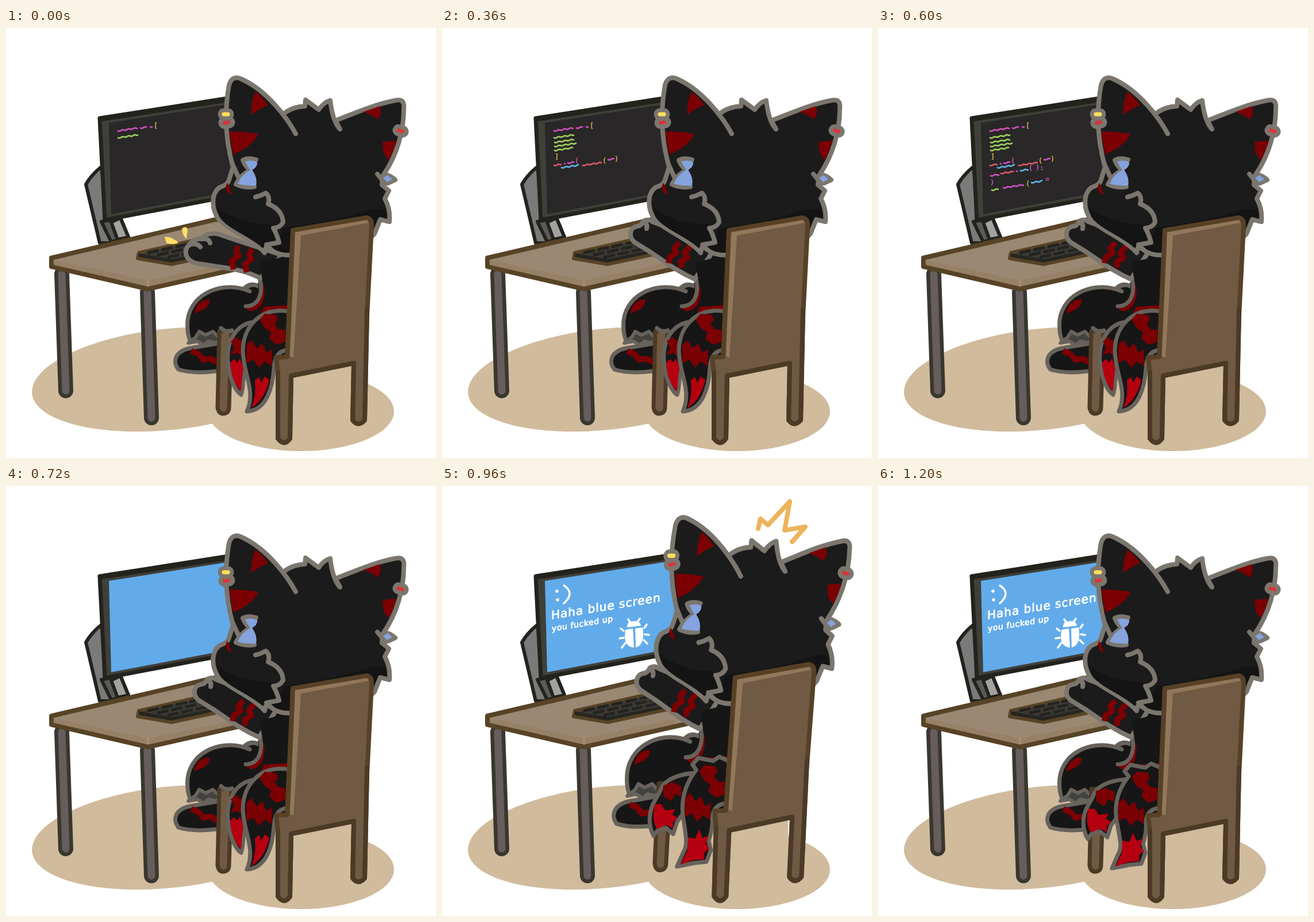
These frames come from a looping animation (748x748 px, 1920 ms). An HTML page:

```html
<!DOCTYPE html>
<html lang="en">
<head>
<meta charset="utf-8">
<title>Coding trouble</title>
<style>
html, body { margin: 0; width: 100%; height: 100%; overflow: hidden; background: #fff }
svg { display: block; width: 100%; height: 100% }
svg * { stroke-linecap: round; stroke-linejoin: round }
.line { fill: none }
.fur { fill: #1b1b1b; stroke: #7b766e; stroke-width: 8 }
.low { fill: #161616; stroke: #67625c; stroke-width: 7 }
.line.fur, .line.low { fill: none }
.red { fill: #7b0004 }
.zig { fill: none; stroke: #7b0004; stroke-width: 10; stroke-linecap: butt }
.tip { fill: #b5000f }
.wood { fill: #705a43; stroke: #574126; stroke-width: 8 }
.white { fill: none; stroke: #fff; stroke-width: 3.5 }
text { font-family: "DejaVu Sans", sans-serif }
#code text { font: bold 12px "DejaVu Sans Mono", monospace }
#code path { fill: none; stroke-width: 2.7 }
</style>
</head>
<body>
<svg viewBox="0 0 748 748">
  <!-- floor -->
  <g fill="#d0bb9c">
    <ellipse cx="285" cy="611" rx="241" ry="88" transform="rotate(-6 285 611)"/>
    <ellipse cx="513" cy="667" rx="162" ry="69"/>
    <path d="M480 595L602 575V612L560 640Z"/>
  </g>

  <!-- monitor -->
  <g stroke="#24221d" stroke-width="6">
    <path d="M164 243Q148 256 139 272L163 374L185 374L166 242" fill="#7a7a7a"/>
    <path d="M166 337L183 372L213 364L199 330Z" fill="#5b5b5b"/>
    <path d="M183 338L194 368L213 364L199 330Z" fill="#a2a2a0"/>
    <path d="M163 157L431 115L418 287L172 334Z" fill="#3f403a" stroke-width="7"/>
  </g>
  <path id="screen" d="M179 165L428 126L414 280L183 324Z"/>
  <path class="line" d="M165 158L429 118" stroke="#24221d" stroke-width="9"/>
  <g id="code"></g>
  <g id="crash" fill="#fff">
    <circle cx="200" cy="183" r="2.8"/><circle cx="201" cy="198" r="2.8"/>
    <path class="white" d="M212 173Q232 186 212 204"/>
    <g stroke="#fff" stroke-width=".8">
      <text transform="matrix(1 -.165 0 1 190 232)" font-size="20" letter-spacing="1">Haha blue screen</text>
      <text transform="matrix(1 -.165 0 1 191 253)" font-size="14" letter-spacing=".6">you fucked up</text>
    </g>
    <path d="M322 246Q321 236 333 235Q345 234 346 243Z"/>
    <path d="M319 250L332 248L334 281Q319 280 318 263ZM336 248L349 246Q354 276 337 281Z"/>
    <path class="white" d="M327 237L324 232M341 235L344 231M316 252L311 248M316 264L309 265M319 273L313 281M352 247L356 241M353 258L360 259M351 268L357 274"/>
  </g>

  <!-- desk -->
  <g class="line">
    <path d="M97 428L104 631M246 460L253 678" stroke="#39372f" stroke-width="26"/>
    <path d="M97 428L104 631M246 460L253 678" stroke="#665d5c" stroke-width="13"/>
  </g>
  <path d="M79 400L365 333L470 345L460 406L247 454L79 415Z" fill="#9a8873" stroke="#574326" stroke-width="8"/>
  <path class="line" d="M87 409L247 444L400 411" stroke="#91795a" stroke-width="9" opacity=".45"/>
  <path class="line" d="M247 438V448" stroke="#a58f72" stroke-width="3"/>
  <path d="M231 391L355 363L422 376L400 387L288 411L229 401Z" fill="#3a3933" stroke="#574326" stroke-width="6"/>
  <path d="M231 398L288 408L400 384V379L288 402L231 392Z" fill="#26251f"/>
  <path class="line" d="M246 391L362 366M263 395L378 370M281 399L393 375" stroke="#24231f" stroke-width="5" style="stroke-linecap:butt" stroke-dasharray="20 5"/>

  <g id="actor">
    <!-- legs and body -->
    <path class="low" d="M410 460Q421 443 437 448L450 440L500 480V560L400 570Z"/>
    <path class="low" d="M320 557C292 563 290 582 300 594Q325 602 366 597L400 580L390 545Z"/>
    <path class="zig" d="M322 562L335 567L343 577L355 575L371 583"/>
    <path d="M424 458C380 438 322 460 316 508Q314 530 322 548L440 545L490 500V440Z" fill="#161616"/>
    <path class="line low" d="M424 458C380 438 322 460 316 508Q314 530 321 546M415 452Q426 442 438 449"/>
    <path class="red" d="M327 497Q331 473 354 472Q355 482 345 489Z"/>
    <path d="M317 548L330 538L336 528L347 534L360 528L372 540L366 548L352 545L344 552L333 545Z" fill="#42433f" stroke="#67625c" stroke-width="6"/>
    <path d="M438 385H500V580H470L440 500Z" fill="#161616"/>
    <path class="red" d="M442 438Q452 448 449 467Q446 490 425 493L415 486Q442 480 442 438ZM448 485L490 482V515L440 508Z"/>
    <path class="line low" d="M441 434Q447 455 440 470Q433 484 417 484"/>

    <path class="wood" d="M371 527L368 660Q370 671 378 671Q388 670 388 660L392 527Z" style="stroke:#4b3a26;stroke-width:7"/>

    <!-- tails -->
    <g id="calm">
      <path class="low" d="M432 511C400 515 383 545 386 580C388 610 400 632 409 638C415 620 410 605 418 592L440 545Z"/>
      <path class="red" d="M391 545L401 537L408 545L414 537V574L402 565L390 569L397 556Z"/>
      <path class="tip" d="M390 582L397 576L402 582L407 575L413 590Q410 612 409 632Q391 613 390 582Z"/>
      <path class="low" d="M492 493C440 485 412 522 412 562C413 603 435 630 419 667C455 665 464 622 466 592Q467 562 490 560Z"/>
      <path class="tip" d="M433 613L440 607L444 617L450 606L458 612Q451 645 427 661Q436 638 433 613Z"/>
      <path class="line low" d="M374 522Q383 531 393 526"/>
    </g>
    <g id="puffed">
      <path class="low" d="M440 510C410 510 379 520 374 540L362 562Q351 590 365 614L373 603L386 601L399 611L405 591L413 580L440 550Z"/>
      <path class="red" d="M379 531L395 525L411 532L411 549L400 545L394 557L380 549Z"/>
      <path class="tip" d="M366 561L377 562L384 572L401 570L396 579L406 584L398 592L398 602L386 596L370 603Q360 585 366 561Z"/>
      <path class="low" d="M492 490L475 483L465 490L439 485L429 496L436 505C411 535 411 568 417 592C421 615 425 628 418 640L407 665L438 659L458 657L465 638L461 622Q468 600 466 585Q467 562 490 560Z"/>
      <path class="tip" d="M425 617L437 619L444 603L450 618L461 613L456 627L463 635L454 642V653L436 654L413 662L424 640Z"/>
    </g>
    <path class="red" d="M441 507L450 497L470 499L473 508L467 514L474 524L486 525V546L471 551L458 541L461 529L450 522ZM418 551L427 543L436 557L446 549L453 565L463 559L462 588L450 580L440 591L430 577L418 583Z"/>

    <!-- arms -->
    <g id="up">
      <path class="fur" d="M440 437C410 424 390 408 363 390L337 374C323 365 326 346 340 345Q347 344 350 336Q358 331 366 337L400 350L470 390Z"/>
      <path class="line fur" d="M350 338Q358 340 356 349"/>
      <path class="zig" d="M413 373L404 383L408 391L396 399L394 409M432 379L422 391L427 399L415 407L417 417"/>
    </g>
    <g id="down">
      <path class="fur" d="M442 435C410 418 370 416 335 410C314 407 306 389 319 377Q326 366 338 367Q350 355 368 358L400 369L480 395Z"/>
      <path class="line fur" d="M320 377Q332 373 338 381M341 367Q353 365 355 374"/>
      <path class="zig" d="M404 379L400 390L405 396L392 406L396 420M428 384L423 394L427 402L415 411L419 425"/>
      <path d="M276 363Q292 364 300 374Q288 378 279 374ZM306 349Q313 343 316 350L314 367Q306 360 306 349Z" fill="#ffe066"/>
    </g>
    <path d="M440 408L490 396V445L447 442Z" fill="#161616"/>

    <!-- head -->
    <path class="fur" d="M504 184C490 158 455 110 412 90Q394 80 388 99C379 150 383 200 395 242L388 264Q386 273 372 277C356 288 358 314 368 330C385 352 425 363 450 391L453 377Q468 396 494 395L600 400L641 358L651 333L667 337Q669 315 659 297L666 283L654 273L655 258C680 222 692 180 692 140Q694 122 677 126C640 133 605 149 573 161L581 176Q568 162 564 126Q553 129 544 142L521 125L520 136Q497 137 482 150"/>
    <path d="M367 312Q410 345 481 342L464 353L472 372L453 374L447 383C420 360 383 348 371 328ZM482 348Q580 335 625 318Q648 311 660 317L663 332L648 328L638 354L600 400L494 391Q470 391 462 380L474 372Z" fill="#141414"/>
    <path class="red" d="M434 111Q446 119 456 134Q441 140 427 151Q425 131 434 111ZM389 180Q415 180 439 184Q431 204 396 220Q391 202 389 180ZM621 146L650 136Q656 149 646 159Q635 149 621 146ZM655 198L679 196Q674 215 666 230L657 218ZM385 269L393 289Q383 288 382 276Z"/>
    <path class="line fur" d="M393 235L404 259M434 294Q443 292 452 287Q460 294 456 306Q481 316 482 338Q476 348 465 348Q471 358 475 373L453 377"/>

    <!-- ribbons and rings -->
    <path class="line fur" d="M435 229Q420 225 412 230Q416 241 425 247Q408 256 400 272Q415 279 432 276M646 254L660 271M657 263L664 256Q672 259 677 264L664 270Z"/>
    <path d="M416 232Q429 229 437 233Q438 242 428 247Q438 260 435 274Q420 275 403 271Q410 254 425 247Q420 241 416 232ZM656 261L664 256L672 263L663 268Z" fill="#85a3dd"/>
    <path class="line" d="M379 150L386 150M380 165L388 164M683 178L690 180" stroke="#7b766e" stroke-width="21"/>
    <path class="line" d="M379 150L386 150" stroke="#ffe05c" stroke-width="7"/>
    <path class="line" d="M380 165L387 164M683 178L690 180" stroke="#d93438" stroke-width="6"/>

    <!-- chair -->
    <path class="wood" d="M499 352L627 330Q637 332 636 345L628 500L624 682Q613 695 603 682L605 583L496 605L494 714Q484 729 473 714V600L470 573L489 572Z"/>
    <path class="line" d="M628 490L624 682Q613 695 603 682L605 583L496 605L494 714Q484 729 473 714V600" stroke="#4b3a26" stroke-width="8"/>
    <path d="M503 355L628 334L631 339L513 361L500 573L494 571Z" fill="#92775b"/>
  </g>
  <g class="line" stroke="#edb45c">
    <path id="shock" d="M550 74L554 57L567 68L605 27L596 77L632 71L609 97" stroke-width="8"/>
    <path id="fade" d="M549 60L553 53L560 57M597 25L606 21L606 31M628 69L638 71L632 78" stroke-width="6"/>
  </g>
</svg>
<script>
const $ = id => document.getElementById(id);
const pink = '#d04fc0', red = '#d8586c', blue = '#5fb4e8', green = '#9ccc5a', gold = '#d8b043';
// step, colour, x, y, then a squiggle width or a symbol
const tokens = [
  [0, pink, 195, 179, 33], [0, pink, 234, 174, 10], [0, pink, 251, 172, 3], [0, gold, 257, 174, '['],
  [0, green, 195, 191, 34], [1, green, 196, 199, 33], [1, green, 196, 206, 37], [2, green, 196, 213, 31],
  [2, gold, 196, 228, ']'],
  [3, red, 195, 239, 12], [3, pink, 213, 236, 1], [3, pink, 219, 235, 10], [3, pink, 231, 235, '('],
  [3, blue, 208, 243, 29], [3, red, 245, 239, 32], [3, gold, 279, 235, '('], [3, pink, 289, 229, 10],
  [3, gold, 300, 232, ')'],
  [4, pink, 196, 257, 14], [4, red, 214, 253, 21], [4, pink, 241, 249, 1], [4, blue, 248, 248, 13],
  [5, pink, 262, 248, '('], [5, pink, 274, 247, '):'],
  [5, pink, 195, 273, ')'], [5, green, 198, 282, 11], [5, pink, 218, 278, 35], [5, gold, 257, 275, '('],
  [5, blue, 267, 269, 18], [5, pink, 291, 267, '=']
];

function squiggle(x, y, w) {
  let d = `M${x} ${y}`;
  for (let i = 1; i <= w; i++) d += `L${x + i} ${y - i * .15 + Math.sin(i * .6) * .8}`;
  return d;
}

$('code').innerHTML = tokens.map(([, color, x, y, v]) => typeof v === 'number'
  ? `<path d="${squiggle(x, y, v)}" stroke="${color}"/>`
  : `<text x="${x}" y="${y}" fill="${color}">${v}</text>`).join('');

const show = (id, on) => $(id).style.display = on ? '' : 'none';

// lean and stretch grow with the height above the floor
function pose(lean, stretch) {
  const floor = 725;
  $('actor').setAttribute('transform',
    `matrix(1 0 ${-lean} ${1 + stretch} ${floor * lean} ${-floor * stretch})`);
}

function draw(now) {
  const step = Math.min(10, Math.floor(now % 1920 / 120));
  const crashed = step >= 6, typing = !crashed && step % 2 === 0;
  $('screen').setAttribute('fill', crashed ? '#62abea' : '#292727');
  show('code', !crashed);
  tokens.forEach((token, i) => $('code').children[i].style.display = token[0] <= step ? '' : 'none');
  show('crash', step >= 7);
  show('down', typing);
  show('up', !typing);
  show('calm', step < 8);
  show('puffed', step >= 8);
  show('shock', step === 8);
  show('fade', step === 9);
  if (step === 8) pose(.029, .05);
  else if (step === 9) pose(-.011, -.02);
  else pose(0, 0);
}

const start = performance.now();
function tick() {
  draw(performance.now() - start);
  requestAnimationFrame(tick);
}
tick();
</script>
</body>
</html>
```
